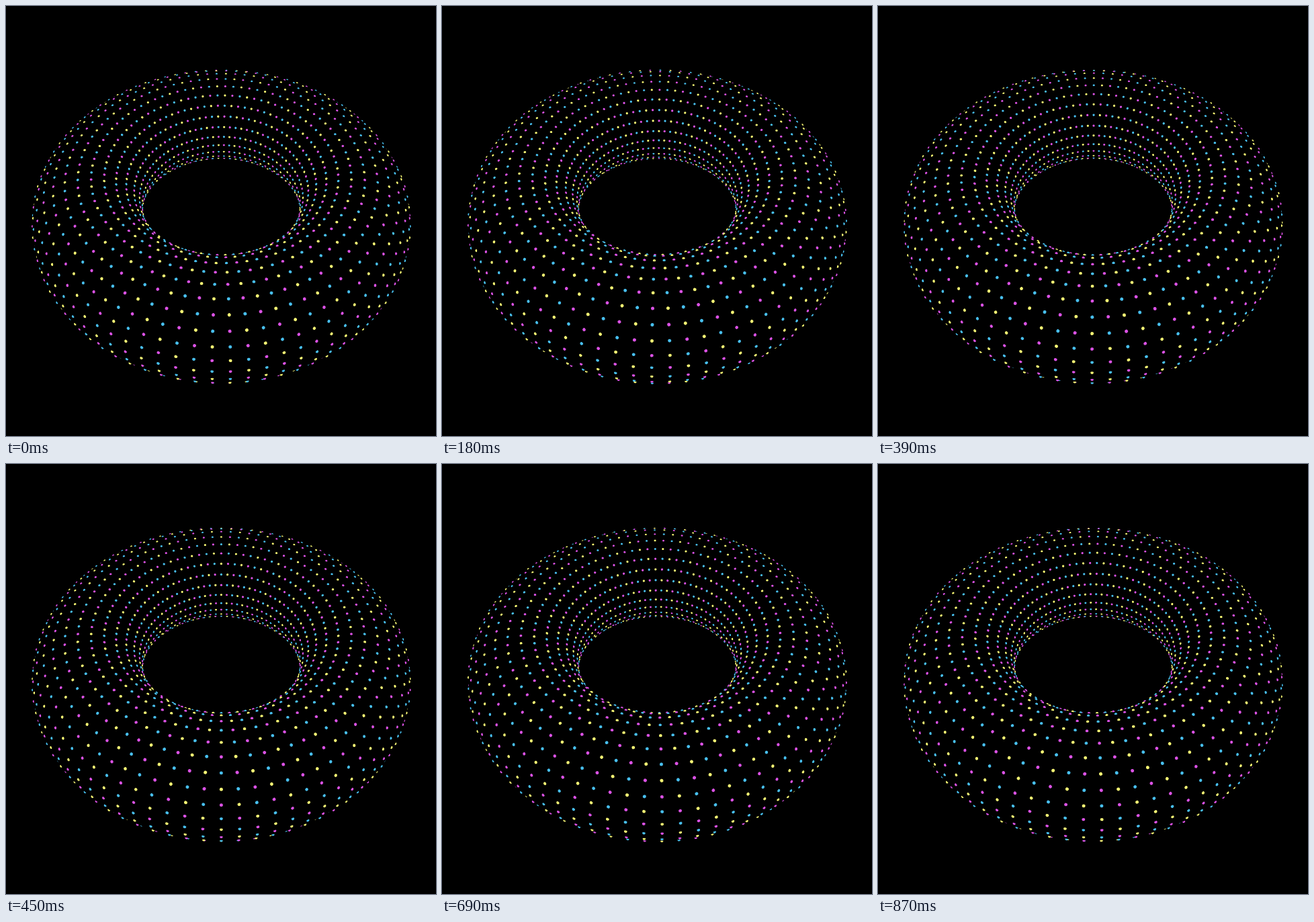
Write an HTML page with a canvas that moves like this. It is 640 px wide and 640 px high and loops after 900 ms.

```html
<!DOCTYPE html>
<html lang="en">
<head>
<meta charset="utf-8">
<title>Dotted torus</title>
<style>
  html, body { margin: 0; width: 100%; height: 100%; overflow: hidden; background: #000; }
  canvas { display: block; width: 640px; height: 640px; }
</style>
</head>
<body>
<canvas id="stage" width="640" height="640"></canvas>
<script>
const ctx = document.getElementById('stage').getContext('2d');
const { sin, cos, atan2, acos, hypot, PI } = Math;

const LOOP = 900, STEP = 30;
const COLS = 84, ROWS = 28;
const RING = 192.4, TUBE = 74.6, BEAD = 1.75;
const FOCAL = 640, LIFT = -35, CX = 320.4, CY = 320;
const TILT = 51.9 * PI / 180, PHASE = 1.8 * PI / 180;
const COLORS = ['#f9f975', '#48c0f0', '#dc52e6'];
const sinT = sin(TILT), cosT = cos(TILT);

const dot = (a, b) => a[0] * b[0] + a[1] * b[1] + a[2] * b[2];

// World (x, up, toward viewer) to camera axes (x, down, depth)
const tilt = (x, y, z) => [x, z * sinT - y * cosT, -z * cosT - y * sinT];
const normal = (u, v) => tilt(cos(v) * sin(u), sin(v), cos(v) * cos(u));

function ringPoint(u) {
  const c = tilt(RING * sin(u), 0, RING * cos(u));
  return [c[0], c[1] + LIFT, c[2] + FOCAL];
}

function project(p) {
  const k = FOCAL / p[2];
  return [CX + p[0] * k, CY + p[1] * k, k];
}

// Angle round the tube where the line of sight grazes it
function limb(u, side) {
  const c = ringPoint(u);
  const a = dot(c, normal(u, 0)), b = dot(c, normal(u, PI / 2));
  const v = atan2(b, a) + side * acos(-TUBE / hypot(a, b));
  return project(c.map((x, i) => x + TUBE * normal(u, v)[i]));
}

const body = new Path2D();
for (const side of [1, -1]) {
  for (let i = 0; i < 240; i++) {
    const [x, y] = limb(i * PI / 120, side);
    body.lineTo(x, y);
    if (i === 0) body.moveTo(x, y);
  }
  body.closePath();
}

function bead(u, v, color) {
  const n = normal(u, v);
  const p = ringPoint(u).map((x, i) => x + TUBE * n[i]);
  const [x, y, k] = project(p);
  const angle = atan2(n[1] * p[2] - p[1] * n[2], n[0] * p[2] - p[0] * n[2]);
  return { x, y, r: BEAD * k, angle, facing: -dot(n, p) / hypot(...p), color };
}

// A bead is half sunk in the surface, which cuts its inner side to an ellipse
function drawBead({ x, y, r, angle, facing, color }) {
  const depth = facing > 0 ? facing : 1;
  ctx.fillStyle = color;
  ctx.beginPath();
  ctx.ellipse(x, y, r, r, angle, -PI / 2, PI / 2);
  ctx.ellipse(x, y, r * depth, r, angle, PI / 2, PI * 1.5);
  ctx.fill();
}

// Each loop the lattice moves one column round and two rows over the tube
function draw(t) {
  const beads = [];
  for (let j = -6; j < ROWS - 6; j++) {
    const v = PHASE + (j + 2 * t) * 2 * PI / ROWS;
    for (let i = 0; i < COLS; i++) {
      beads.push(bead((i - 0.5 + t) * 2 * PI / COLS, v, COLORS[(i + j + 6) % 3]));
    }
  }
  ctx.fillStyle = '#000';
  ctx.fillRect(0, 0, 640, 640);
  beads.filter(b => b.facing <= 0).forEach(drawBead);
  ctx.fillStyle = '#000';
  ctx.fill(body, 'evenodd');
  beads.filter(b => b.facing > 0).forEach(drawBead);
}

const start = performance.now();
function tick() {
  const ms = (performance.now() - start) % LOOP;
  draw(Math.floor(ms / STEP) * STEP / LOOP);
  requestAnimationFrame(tick);
}
tick();
</script>
</body>
</html>
```
